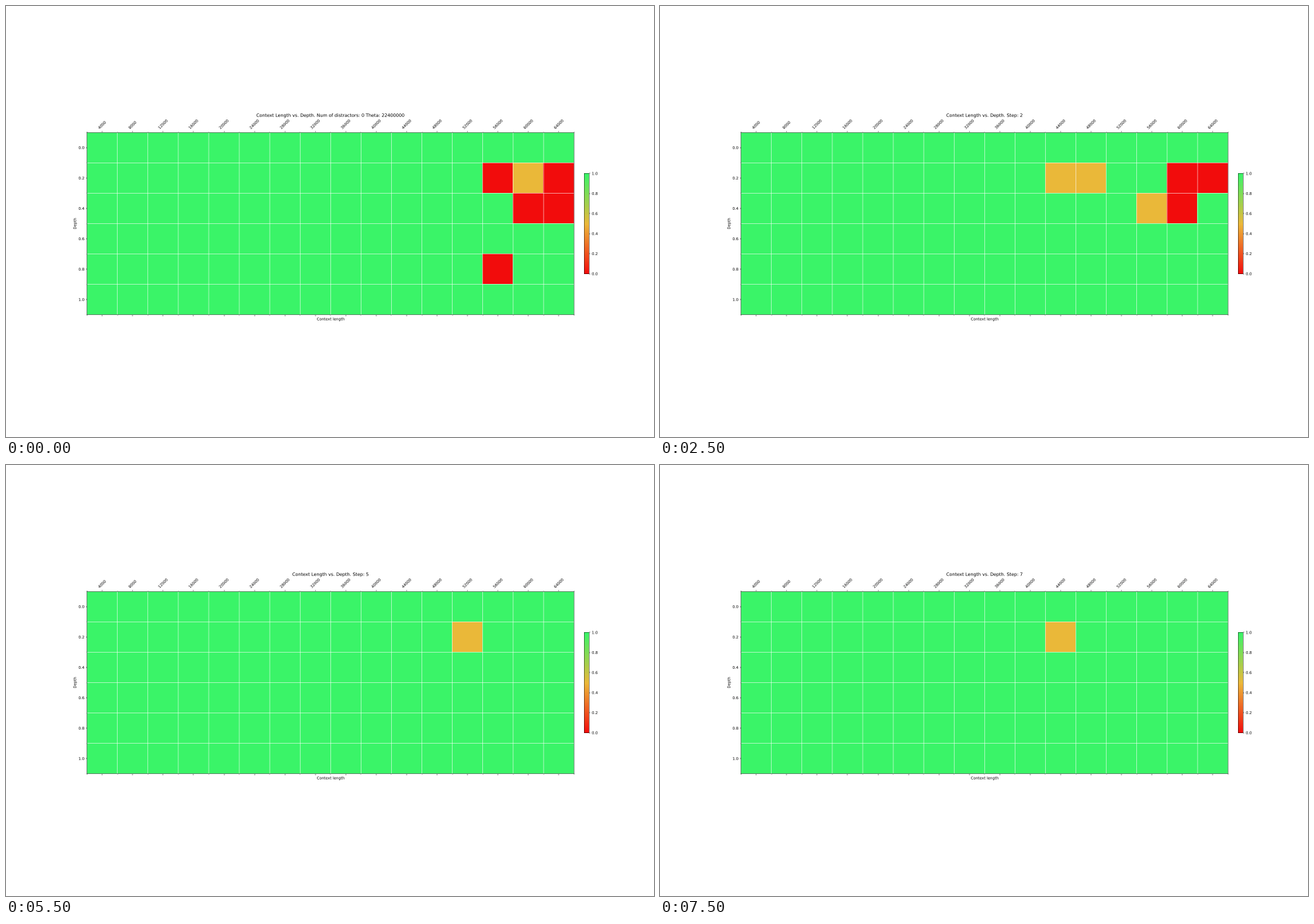
A matplotlib script that plays this animation: 917x611 px, repeating every 8 s.

```python
import matplotlib.pyplot as plt
import numpy as np
from matplotlib.animation import FuncAnimation
from matplotlib.colors import LinearSegmentedColormap
from matplotlib.patheffects import Normal

W, H, DPI = 917, 611, 38.2
COLS, ROWS = 16, 6
RED, AMBER, GREEN = "#f20c0c", "#ebb839", "#3af468"

# Unsnapped lines and path-drawn text keep sub-pixel positions at this low dpi.
plt.rcParams.update({
    "font.family": "DejaVu Sans",
    "text.hinting": "none",
    "path.snap": False,
    "path.effects": [Normal()],
})

# Spells below full score: (depth row, length column, first step, last step)
FAILED = [(1, 13, 0, 0), (1, 14, 1, 4), (1, 15, 0, 2), (2, 14, 0, 2),
          (2, 15, 0, 1), (4, 13, 0, 1), (1, 12, 6, 6)]
PARTIAL = [(1, 14, 0, 0), (1, 13, 1, 1), (2, 13, 1, 2), (1, 10, 2, 2),
           (1, 11, 2, 2), (1, 12, 4, 5), (1, 10, 7, 7)]


def scores(step):
    grid = np.ones((ROWS, COLS))
    for spells, score in ((FAILED, 0), (PARTIAL, 0.5)):
        for row, col, first, last in spells:
            if first <= step <= last:
                grid[row, col] = score
    return grid


def heading(step):
    tail = f"Step: {step}" if step else "Num of distractors: 0 Theta: 22400000"
    return f"Context Length vs. Depth. {tail}"


cmap = LinearSegmentedColormap.from_list("score", [RED, AMBER, GREEN])
x_edges, y_edges = np.arange(-0.5, COLS), np.arange(-0.5, ROWS)

fig, ax = plt.subplots(figsize=((W + 0.01) / DPI, (H + 0.01) / DPI), dpi=DPI)
ax.set_facecolor(GREEN)
mesh = ax.pcolormesh(x_edges, y_edges, scores(0), cmap=cmap, vmin=0, vmax=1)
fig.colorbar(mesh, ax=ax, fraction=0.01, pad=0.02, ticks=np.linspace(0, 1, 6))

ax.set_aspect("equal")
ax.set_xlim(-0.5, COLS - 0.5)
ax.set_ylim(ROWS - 0.5, -0.5)
ax.xaxis.tick_top()
ax.xaxis.set_ticks_position("both")
ax.set_xticks(range(COLS), [str(4000 * (c + 1)) for c in range(COLS)], rotation=45)
ax.set_yticks(range(ROWS), [f"{r / 5:.1f}" for r in range(ROWS)])
ax.set_xticks(x_edges, minor=True)
ax.set_yticks(y_edges, minor=True)
ax.grid(which="minor", color="w", linestyle="-", linewidth=1)
ax.set_xlabel("Context length")
ax.set_ylabel("Depth")
title = ax.set_title(heading(0))


def draw(frame):
    # The opening state holds for three ticks, every later step for two.
    step = max(0, (frame - 1) // 2)
    mesh.set_array(scores(step))
    title.set_text(heading(step))
    return mesh, title


anim = FuncAnimation(fig, draw, frames=16, interval=500, repeat=True, repeat_delay=0,
                     blit=False)
plt.show()
```
